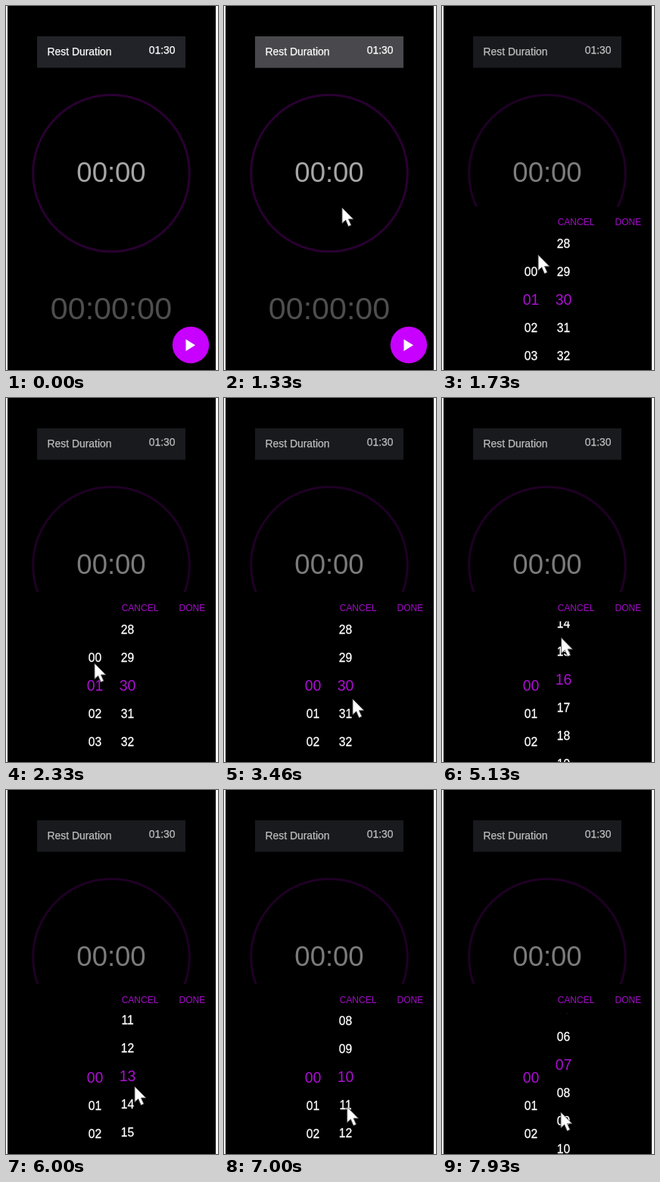
Write an HTML page that moves like this. It is 280 px wide and 480 px high and loops after 8 s.

```html
<!DOCTYPE html>
<html lang="en">
<head>
<meta charset="utf-8">
<title>Rest timer</title>
<style>
  html, body { margin: 0; width: 100%; height: 100%; overflow: hidden; background: #fff; }
  svg { display: block; width: 280px; height: 480px; font-family: "Liberation Sans", Arial, sans-serif; }
  .mid { text-anchor: middle; }
  .row text { font-size: 13.9px; fill: #fff; stroke: #fff; stroke-width: .25; }
  .wheel text { font-size: 15.6px; fill: #fff; stroke: #fff; stroke-width: .3; }
  .wheel .on { font-size: 19.5px; fill: #ab10d2; stroke: none; }
  .action { font-size: 12px; fill: #a30cc9; }
</style>
</head>
<body>
<svg viewBox="0 0 280 480">
  <defs>
    <clipPath id="screen"><rect x="2" width="275" height="480"/></clipPath>
    <clipPath id="window"><rect y="294.5" width="280" height="186"/></clipPath>
  </defs>
  <g clip-path="url(#screen)">
    <rect width="280" height="480"/>
    <g class="row">
      <rect x="41" y="40" width="196" height="41.5" fill="#212328"/>
      <rect id="press" x="41" y="40" width="196" height="41.5" fill="#49494d"/>
      <text x="54.5" y="65">Rest Duration</text>
      <text x="188.7" y="63.2">01:30</text>
    </g>
    <circle cx="139" cy="220.5" r="103.3" fill="none" stroke="#2a0032" stroke-width="3"/>
    <text class="mid" x="139" y="232" font-size="36.5" fill="#a6a6a6">00:00</text>
    <text class="mid" x="139" y="412.7" font-size="41.2" fill="#4e4e4e">00:00:00</text>
    <circle cx="244" cy="447" r="24.2" fill="#c800ff"/>
    <path d="M237.5 439.5V455L250 447.2z" fill="#fff"/>
    <rect id="shade" width="280" height="480"/>
    <g id="panel">
      <rect y="256" width="280" height="224"/>
      <text class="action" x="152.7" y="280.5">CANCEL</text>
      <text class="action" x="228.5" y="280.5">DONE</text>
      <g clip-path="url(#window)">
        <g class="wheel" id="min"></g>
        <g class="wheel" id="sec"></g>
      </g>
    </g>
    <path id="cursor" d="M0 0V20.5L4.7 16.3 8.3 24.6 12 23 8.4 15H14.8z"
          fill="#fff" stroke="#555" stroke-width=".9"/>
  </g>
</svg>
<script>
  const LOOP = 8000, TICK = 1000 / 15, ROW = 37, CENTER = 379;
  const HOME = { x: 157, y: 306 };
  const $ = id => document.getElementById(id);

  const smooth = p => p * p * (3 - 2 * p);
  const easeOut = p => 1 - (1 - p) ** 3;
  const tween = (t, start, length, ease = smooth) =>
    ease(Math.min(1, Math.max(0, (t - start) / length)));

  // Each flick drags down from HOME and lets the seconds coast on.
  const flicks = [
    { start: 3700, steps: 7, x: 160, y: 415 },
    { start: 4513, steps: 7, x: 164, y: 420 },
    { start: 5608, steps: 3, x: 170, y: 391 },
    { start: 6560, steps: 3, x: 163, y: 425 },
    { start: 7697, steps: 3, x: 157, y: 425 }
  ];

  const moves = [
    { start: 1000, length: 333, x: 156, y: 266 },
    { start: 1333, length: 600, x: 117, y: 350 },
    { start: 2333, length: 270, x: 121, y: 398 },
    { start: 2660, length: 200, x: 140, y: 410 },
    { start: 3000, length: 460, x: 170, y: 397 },
    { start: 3467, length: 230, ...HOME },
    ...flicks.flatMap(({ start, x, y }) => [
      { start, length: 240, x, y },
      { start: start + 400, length: 270, ...HOME }
    ])
  ];

  function pointerAt(t) {
    return moves.reduce((from, to) => {
      const p = tween(t, to.start, to.length);
      return { x: from.x + (to.x - from.x) * p, y: from.y + (to.y - from.y) * p };
    }, { x: 208, y: 63 });
  }

  // A stronger flick coasts for longer.
  const secondsAt = t => flicks.reduce(
    (pos, f) => pos - f.steps * tween(t, f.start, 200 + 100 * f.steps, easeOut), 30);

  function makeWheel(id, x) {
    const cells = Array.from({ length: 7 }, () => {
      const cell = document.createElementNS("http://www.w3.org/2000/svg", "text");
      cell.setAttribute("class", "mid");
      cell.setAttribute("x", x);
      return $(id).appendChild(cell);
    });
    return pos => {
      const mid = Math.round(pos);
      cells.forEach((cell, i) => {
        const n = mid + i - 3, on = n === mid;
        cell.textContent = n < 0 || n > 59 ? "" : String(n).padStart(2, "0");
        cell.classList.toggle("on", on);
        cell.setAttribute("y", CENTER + (n - pos) * ROW + (on ? 6.5 : 5.5));
      });
    };
  }

  const setMinutes = makeWheel("min", 117.5);
  const setSeconds = makeWheel("sec", 160.5);

  function draw() {
    const now = performance.now() % LOOP;
    const t = Math.floor((now + 7) / TICK) * TICK % LOOP;
    const open = tween(t, 1470, 400, easeOut);
    const { x, y } = pointerAt(t);
    $("press").setAttribute("opacity", tween(t, 1000, 150) - tween(t, 1400, 250));
    $("shade").setAttribute("opacity", .26 * open);
    $("panel").setAttribute("transform", `translate(0 ${224 * (1 - open)})`);
    setMinutes(1 - tween(t, 2333, 270));
    setSeconds(secondsAt(t));
    $("cursor").setAttribute("transform", `translate(${x} ${y})`);
    $("cursor").setAttribute("visibility", t < 799 ? "hidden" : "visible");
    requestAnimationFrame(draw);
  }
  draw();
</script>
</body>
</html>
```
